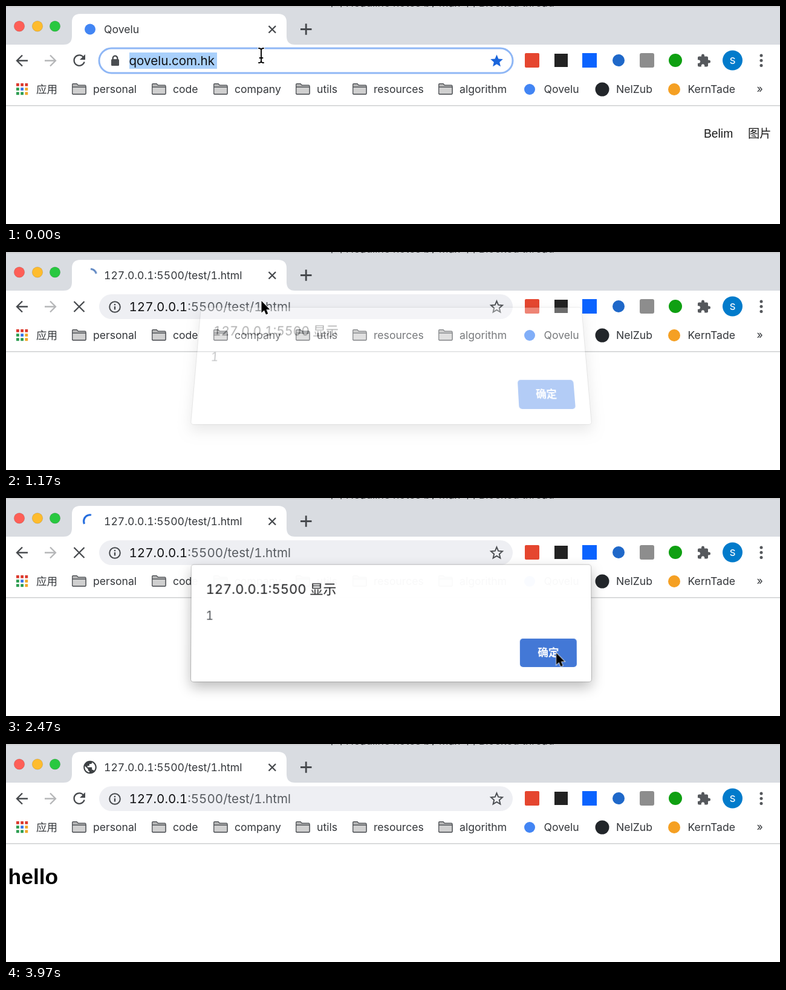
Recreate the animation shown at these times as an HTML page. Size 1280x361 px, loop 4.01 s.

```html
<!DOCTYPE html>
<html lang="zh">
<head>
<meta charset="utf-8">
<title>Browser reload</title>
<style>
html, body { margin: 0; width: 100%; height: 100%; overflow: hidden; background: #fff; }
#stage { position: relative; width: 1280px; height: 361px; overflow: hidden; }
svg { position: absolute; left: 0; top: 0; }
svg, .dialog { font: 17.6px Inter, "Noto Sans CJK SC", sans-serif; font-variant-numeric: tabular-nums; }
text { fill: #33363a; white-space: pre; }
.line { fill: none; stroke: #46494d; stroke-width: 2.3; }
.bold { stroke-width: 2.9; }
.url { font-size: 20.6px; fill: #585c61; }
.host { fill: #101113; }
.page { font: 19.3px "Liberation Sans", "Noto Sans CJK SC", sans-serif; fill: #1a1a1a; }

/* hard switches */
.step { animation: 4010ms step-end infinite; }
.to-paste { animation-name: to-paste; }
.pasted { animation-name: pasted; }
.from-go { animation-name: from-go; }
.to-commit { animation-name: to-commit; }
.from-commit { animation-name: from-commit; }
.loading { animation-name: loading; }
.busy { animation-name: busy; }
.idle { animation-name: idle; }
.loaded { animation-name: loaded; }
.hello { animation-name: hello; }
.arrow { animation-name: arrow; }
.beam { animation-name: beam; }
@keyframes to-paste { 17.08% { visibility: hidden; } }
@keyframes pasted { 0%, 26.68% { visibility: hidden; } 17.08% { visibility: visible; } }
@keyframes from-go { 0% { visibility: hidden; } 26.68% { visibility: visible; } }
@keyframes to-commit { 27.43% { visibility: hidden; } }
@keyframes from-commit { 0% { visibility: hidden; } 27.43% { visibility: visible; } }
@keyframes loading { 0%, 68.15% { visibility: hidden; } 27.43% { visibility: visible; } }
@keyframes busy { 0%, 68.15% { visibility: hidden; } 26.68% { visibility: visible; } }
@keyframes idle { 26.68% { visibility: hidden; } 68.15% { visibility: visible; } }
@keyframes loaded { 0% { visibility: hidden; } 68.15% { visibility: visible; } }
@keyframes hello { 0% { visibility: hidden; } 64.84% { visibility: visible; } }
@keyframes arrow { 0%, 65.09% { visibility: hidden; } 17.08% { visibility: visible; } }
@keyframes beam { 17.08% { visibility: hidden; } 65.09% { visibility: visible; } }

.popup { animation: popup 4010ms linear infinite; filter: drop-shadow(0 5px 7px rgba(0,0,0,.25)); }
@keyframes popup {
  0%, 17.08%, 26.68%, 100% { opacity: 0; }
  19.2%, 24.7% { opacity: 1; }
}

.spin { animation: spin 4010ms linear infinite; }
@keyframes spin {
  0%, 27.43% { transform: rotate(254deg); }
  29.18% { transform: rotate(275deg); }
  39.5% { transform: rotate(401deg); }
  68.15%, 100% { transform: rotate(665deg); }
}
.arc { fill: none; stroke-width: 3; animation: arc 4010ms cubic-bezier(.4,0,.2,1) infinite; }
@keyframes arc {
  0%, 27.43% { stroke-dasharray: 5 355; stroke-dashoffset: 0; stroke: #8296b4; }
  29.18% { stroke-dasharray: 70 290; stroke: #5d86c2; }
  39.5% { stroke-dasharray: 270 90; stroke-dashoffset: 0; stroke: #1a66dc; }
  56.11% { stroke-dasharray: 5 355; stroke-dashoffset: -270; stroke: #1a66dc; }
  72.72%, 100% { stroke-dasharray: 270 90; stroke-dashoffset: -270; stroke: #1a66dc; }
}

.pointer { animation: move 4010ms linear infinite; }
@keyframes move {
  0%, 33.17% { transform: translate(422px, 81px); animation-timing-function: ease-in; }
  40.65% { transform: translate(673px, 180px); animation-timing-function: ease-out; }
  48.63%, 70% { transform: translate(909.5px, 256.5px); animation-timing-function: ease-in; }
  72.3%, 100% { transform: translate(920px, 390px); }
}

.dialog {
  position: absolute; left: 306px; top: 112px; width: 662px; height: 193px;
  background: #fff; border-radius: 4px; transform-origin: 50% 100%;
  box-shadow: 0 0 0 1px rgba(0,0,0,.2), 0 9px 22px rgba(0,0,0,.28);
  animation: dialog 4010ms linear infinite;
}
.dialog * { position: absolute; left: 24px; white-space: pre; line-height: 30px; }
.dialog b { top: 25px; font-size: 22px; font-weight: 400; color: #111214; }
.dialog p { top: 69px; margin: 0; font-size: 19.5px; color: #4a4d52; }
.dialog i {
  left: 544px; top: 122px; width: 94px; height: 47px; border-radius: 5px;
  background: #1a65e2; color: #fff; font-style: normal; font-weight: 700; line-height: 46px; text-align: center;
  animation: hover 4010ms step-end infinite;
}
@keyframes hover { 46.13% { background: #3c73d5; } }
@keyframes dialog {
  0%, 27.68%, 65.34%, 100% { opacity: 0; transform: translateY(-30px) perspective(1000px) rotateX(21deg) scaleY(1.157); }
  29.18%, 64.05% { opacity: .33; transform: translateY(-20px) perspective(1000px) rotateX(14.8deg) scaleY(1.09); }
  32.17%, 61.5% { opacity: 1; transform: translateY(0) perspective(1000px) rotateX(0deg) scaleY(1); }
}
</style>
</head>
<body>
<div id="stage">
<svg width="1280" height="361" viewBox="0 0 1280 361">
  <defs>
    <path id="globe" transform="translate(-12 -12)" d="M12 2C6.48 2 2 6.48 2 12s4.48 10 10 10 10-4.48 10-10S17.52 2 12 2zm-1 17.93c-3.95-.49-7-3.85-7-7.93 0-.62.08-1.21.21-1.79L9 15v1c0 1.1.9 2 2 2v1.93zm6.9-2.54c-.26-.81-1-1.39-1.9-1.39h-1v-3c0-.55-.45-1-1-1H8v-2h2c.55 0 1-.45 1-1V7h2c1.1 0 2-.9 2-2v-.41c2.93 1.19 5 4.06 5 7.41 0 2.08-.8 3.97-2.1 5.39z"/>
    <path id="star" d="M0-10.5 2.9-3.6 10.3-3 4.7 1.9 6.4 9.2 0 5.3-6.4 9.2-4.7 1.9-10.3-3-2.9-3.6Z"/>
    <path id="ibeam" d="M-4-11Q0-11 0-8Q0-11 4-11M0-8V10M-4 13Q0 13 0 10Q0 13 4 13M-2.5 5H2.5"/>
    <g id="folder" stroke="#55585c" stroke-width="1.4">
      <path fill="#b9b9b9" d="M.7 16.5V2.2Q.7.7 2.2.7H8l2.4 2.6H21.5Q23 3.3 23 4.8V16.5Q23 18 21.5 18H2.2Q.7 18 .7 16.5Z"/>
      <path fill="#d0d0d0" d="M.7 6.3H23V16.5Q23 18 21.5 18H2.2Q.7 18 .7 16.5Z"/>
    </g>
  </defs>

  <!-- window frame -->
  <rect width="1280" height="3" fill="#cfd0d2"/>
  <text x="536" y="1">|  | Headline notes by Max  | | Blocked thread</text>
  <rect y="2" width="1280" height="62" fill="#d9dce1"/>
  <path fill="#fff" d="M95 64Q109 64 109 50V27Q109 13 123 13H450Q464 13 464 27V50Q464 64 478 64Z"/>
  <g stroke="#000" stroke-opacity=".12">
    <circle cx="22" cy="33.5" r="8.7" fill="#fe5f57"/>
    <circle cx="52" cy="33.5" r="8.7" fill="#febc2e"/>
    <circle cx="81" cy="33.5" r="8.7" fill="#28c840"/>
  </g>
  <path class="line" d="M434.5 33 446 44.5M446 33 434.5 44.5"/>
  <path class="line bold" d="M487 38.5H505.5M496.2 29.3V47.7"/>

  <!-- tab -->
  <g class="step to-commit">
    <circle cx="139" cy="38.5" r="9" fill="#4285f4"/>
    <text x="162" y="45">Qovelu</text>
  </g>
  <text class="step from-commit" x="162" y="45">127.0.0.1:5500/test/1.html</text>
  <g class="step loading" transform="translate(139 38.5)">
    <g class="spin"><circle class="arc" r="10.5" pathLength="360"/></g>
  </g>
  <g class="step loaded"><use href="#globe" transform="translate(139 38.5) scale(1.08)" fill="#3c4043"/></g>

  <!-- toolbar -->
  <path class="line" d="M36 90.5H18.5M27 81.5 18 90.5 27 99.5"/>
  <path class="line" style="stroke:#b5b6b8" d="M64 90.5H81.5M73 81.5 82 90.5 73 99.5"/>
  <g class="step idle">
    <path class="line" d="M128.3 85A8.7 8.7 0 1 0 129.6 92.5"/>
    <path fill="#46494d" d="M131 80V89H122Z"/>
  </g>
  <path class="step busy line" d="M112.5 82 129.5 99M129.5 82 112.5 99"/>

  <rect x="858" y="78" width="24" height="24" rx="2" fill="#e5462f"/>
  <rect x="907" y="79" width="22" height="22" fill="#222"/>
  <rect x="953" y="78" width="24" height="24" fill="#0a63ff"/>
  <circle cx="1013" cy="90" r="10" fill="#1f68c9"/>
  <rect x="1048" y="78" width="24" height="24" rx="3" fill="#8d8d8d"/>
  <circle cx="1107" cy="90" r="11" fill="#0fa012"/>
  <path transform="translate(1142 78.5)" fill="#55585c" d="M20.5 11H19V7c0-1.1-.9-2-2-2h-4V3.5C13 2.12 11.88 1 10.5 1S8 2.12 8 3.5V5H4c-1.1 0-2 .9-2 2v3.8H3.5c1.49 0 2.7 1.21 2.7 2.7s-1.21 2.7-2.7 2.7H2V20c0 1.1.9 2 2 2h3.8v-1.5c0-1.49 1.21-2.7 2.7-2.7s2.7 1.21 2.7 2.7V22H17c1.1 0 2-.9 2-2v-4h1.5a2.5 2.5 0 0 0 0-5z"/>
  <circle cx="1201.5" cy="90" r="16.5" fill="#027bcb"/>
  <text x="1201.5" y="95.5" text-anchor="middle" style="font-size:15px;font-weight:500;fill:#fff">S</text>
  <g fill="#55585c">
    <circle cx="1249" cy="82" r="2.5"/><circle cx="1249" cy="90.3" r="2.5"/><circle cx="1249" cy="98.6" r="2.5"/>
  </g>

  <!-- bookmarks -->
  <g id="apps"></g>
  <text x="50" y="144">应用</text>
  <g id="folders"></g>
  <circle cx="866" cy="138" r="9" fill="#4285f4"/>
  <text x="889.5" y="144">Qovelu</text>
  <circle cx="986" cy="138" r="11.5" fill="#22262a"/>
  <text x="1009" y="144">NelZub</text>
  <circle cx="1105" cy="138" r="10" fill="#f5a023"/>
  <text x="1127.5" y="144">KernTade</text>
  <text x="1241.5" y="143">»</text>
  <rect y="164" width="1280" height="2" fill="#dadbdc"/>

  <!-- page -->
  <g class="step to-commit">
    <text class="page" x="1154" y="218">Belim</text>
    <text class="page" x="1227" y="218">图片</text>
  </g>
  <text class="step hello page" x="3.6" y="232" style="font-size:35.4px;font-weight:700;fill:#000">hello</text>

  <!-- suggestions -->
  <g class="popup">
    <rect x="145" y="64" width="702" height="177" rx="11" fill="#fff"/>
    <rect x="145" y="117" width="702" height="71" fill="#e2e8e8"/>
    <use href="#globe" transform="translate(180 152)" fill="#5f6368"/>
    <text class="url" x="220" y="145">Document</text>
    <text class="url" x="220" y="174.5" style="font-weight:600;fill:#1a66dc">http://127.0.0.1:5500/test/1.html</text>
    <rect x="718" y="130" width="115" height="45" rx="22.5" fill="#fff"/>
    <path class="line" d="M745 145H760V159H745ZM753 145V150H760"/>
    <text x="777" y="158.5" style="fill:#1a66dc">切换</text>
    <path class="line" d="M183 218 188.5 223.5M184 213A5.5 5.5 0 1 1 173 213A5.5 5.5 0 1 1 184 213"/>
    <text class="url" x="220" y="222">http://127.0.0.1:5500/test/1.html - 寻禾 搜索</text>
  </g>

  <!-- address bar -->
  <g class="step to-paste">
    <rect x="154" y="70" width="684" height="41" rx="20.5" fill="#fff" stroke="#8fb7f5" stroke-width="3"/>
    <rect x="174" y="88" width="13" height="11" rx="1.5" fill="#4a4d51"/>
    <path class="line" d="M176.7 89V86.5A3.8 3.8 0 0 1 184.3 86.5V89"/>
    <rect x="204" y="77" width="145" height="27" fill="#a9d0fb"/>
    <text class="url host" x="203.5" y="97.5">qovelu.com.hk</text>
    <use href="#star" transform="translate(811.5 91)" fill="#1a65dc"/>
  </g>
  <g class="step pasted">
    <use href="#globe" transform="translate(180 90.5)" fill="#3c4043"/>
    <text class="url" x="220" y="97.5">http://<tspan class="host">127.0.0.1</tspan>:5500/test/1.html</text>
    <rect x="537" y="78" width="1.5" height="25" fill="#222"/>
  </g>
  <g class="step from-go">
    <rect x="154" y="70" width="684" height="41" rx="20.5" fill="#eeeff3"/>
    <circle class="line" cx="180" cy="91" r="8.8" style="stroke-width:2"/>
    <path class="line" d="M180 90V95.5M180 86V88.3"/>
    <text class="url" x="203.5" y="97.5"><tspan class="host">127.0.0.1</tspan>:5500/test/1.html</text>
    <use href="#star" transform="translate(811.5 91) scale(.92)" fill="none" stroke="#4a4d51" stroke-width="2.1"/>
  </g>
</svg>

<div class="dialog"><b>127.0.0.1:5500 显示</b><p>1</p><i>确定</i></div>

<svg width="1280" height="361" viewBox="0 0 1280 361">
  <g class="pointer">
    <path class="step arrow" stroke="#fff" stroke-width="1.6" paint-order="stroke" d="M.5 0V19.5L5 15.4 8 22.4 11.3 21 8.4 14.2H14.3Z"/>
    <g class="step beam" fill="none" stroke-linecap="round">
      <use href="#ibeam" stroke="#fff" stroke-width="4"/>
      <use href="#ibeam" stroke="#000" stroke-width="1.9"/>
    </g>
  </g>
</svg>
</div>
<script>
const byId = id => document.getElementById(id);
const red = '#dc3b2f', green = '#2f9e52', blue = '#3b78e7', amber = '#f2a72a';
byId('apps').innerHTML = [red, red, red, green, blue, amber, green, green, amber]
  .map((c, i) => `<rect x="${17 + i % 3 * 7.2}" y="${128 + Math.floor(i / 3) * 7.2}" width="4.8" height="4.8" fill="${c}"/>`)
  .join('');
const folders = { personal: 109, code: 241, company: 343, utils: 479, resources: 573, algorithm: 715 };
byId('folders').innerHTML = Object.entries(folders)
  .map(([name, x]) => `<use href="#folder" x="${x}" y="128"/><text x="${x + 35}" y="144">${name}</text>`)
  .join('');
</script>
</body>
</html>
```
